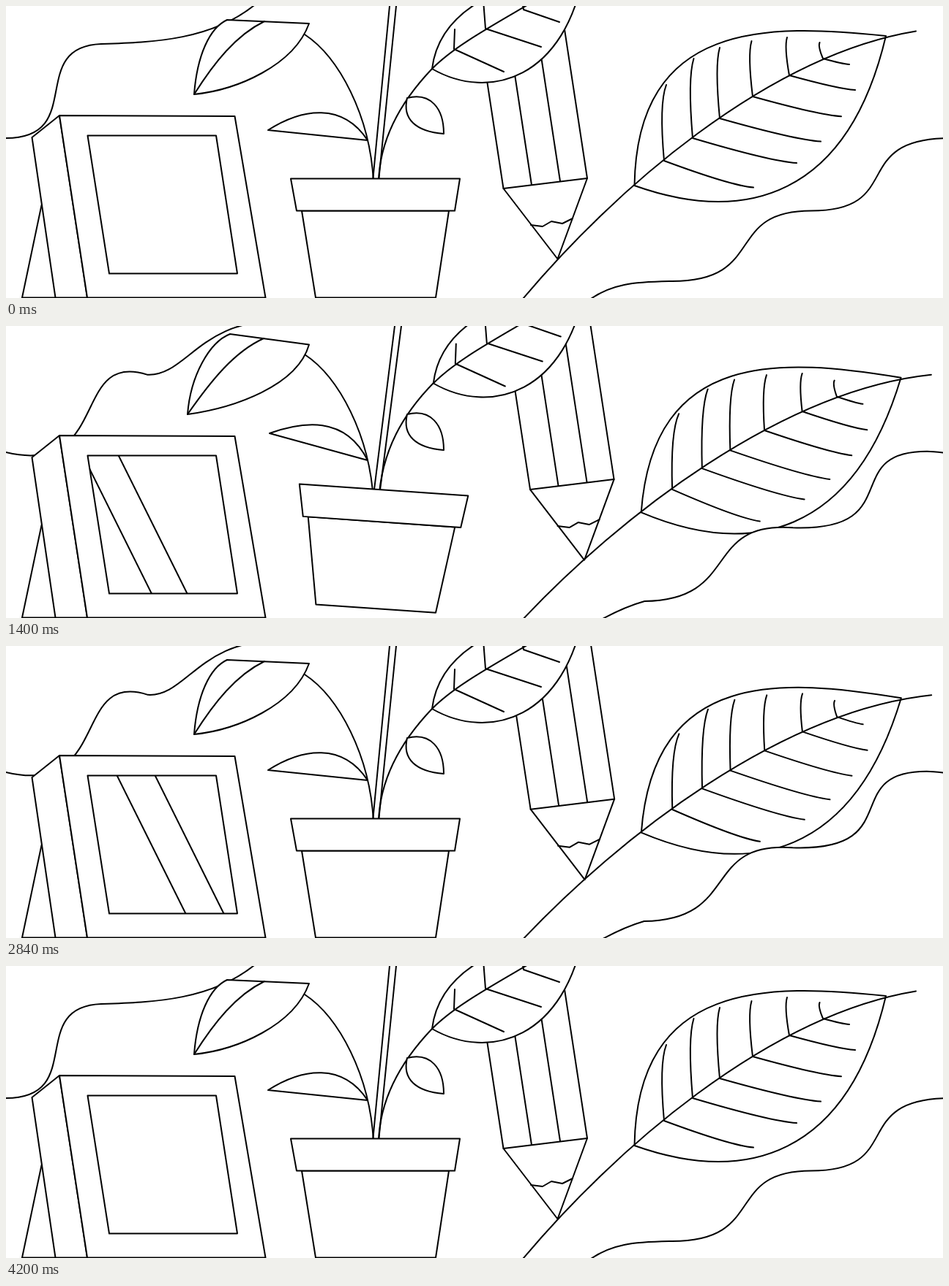
Recreate the animation shown at these times as an HTML page with a canvas. Size 1280 by 400 pixels, loop 4.24 s.

```html
<!DOCTYPE html>
<html lang="en">
<head>
<meta charset="utf-8">
<title>Desk line drawing</title>
<style>
  html, body { margin: 0; width: 100%; height: 100%; overflow: hidden; background: #fff; }
  canvas { display: block; }
</style>
</head>
<body>
<canvas id="stage" width="1280" height="400"></canvas>
<script>
const ctx = document.getElementById('stage').getContext('2d');
const LOOP = 4240, HALF = LOOP / 2, FRAME = 40;

const clamp = u => Math.min(1, Math.max(0, u));
const easeInOut = u => u < 0.5 ? 4 * u ** 3 : 1 - 4 * (1 - u) ** 3;
const ramp = (t, from, to) => easeInOut(clamp((t - from) / (to - from)));

// Points are [x, y], or [x, y, endX, endY] when they move with k.
const morph = (points, k) => points.map(([x, y, x2 = x, y2 = y]) => [x + (x2 - x) * k, y + (y2 - y) * k]);

// A start point followed by groups of three Bézier points.
function trace(points) {
  ctx.beginPath();
  ctx.moveTo(...points[0]);
  for (let i = 1; i < points.length; i += 3)
    ctx.bezierCurveTo(...points[i], ...points[i + 1], ...points[i + 2]);
}

function curve(...points) {
  trace(points);
  ctx.stroke();
}

function shape(...points) {
  trace(points);
  ctx.closePath();
  ctx.fill();
  ctx.stroke();
}

function line(...points) {
  ctx.beginPath();
  points.forEach(p => ctx.lineTo(...p));
  ctx.stroke();
}

function polygon(...points) {
  ctx.beginPath();
  points.forEach(p => ctx.lineTo(...p));
  ctx.closePath();
  ctx.fill();
  ctx.stroke();
}

function group(x, y, degrees, [pivotX, pivotY], draw) {
  ctx.save();
  ctx.translate(x + pivotX, y + pivotY);
  ctx.rotate(degrees * Math.PI / 180);
  ctx.translate(-pivotX, -pivotY);
  draw();
  ctx.restore();
}

function drawLeftWave(drift) {
  curve(...morph([
    [0, 181, 0, 171.5],
    [110, 181, 150, 212], [28, 56, 100, 29], [130, 52, 205, 69.5],
    [200, 50, 255, 74], [285, 47, 263, -24], [345, -6, 385, -6]
  ], drift));
}

function drawRightWave(drift) {
  const corner = [1340, 430];
  shape(...morph([
    [790, 408, 800, 411],
    [825, 378, 830, 395], [865, 378, 848, 384], [910, 377, 865, 377],
    [1040, 377, 997, 375], [980, 280.5, 945, 265], [1100, 280.5, 1070, 275.5],
    [1230, 280.5, 1232, 282], [1150, 181, 1135, 170], [1290, 181, 1252, 170],
    [1310, 181, 1275, 170], [1320, 181, 1300, 178], [1340, 181],
    corner, corner, corner
  ], drift));
}

function drawBox(t) {
  polygon([48.5, 273], [22, 399.5], [100, 399.5]);
  polygon([73, 150], [35.5, 180], [67.5, 399.5], [111, 399.5]);
  polygon([73, 150], [312.5, 151], [354.5, 399.5], [111, 399.5]);
  polygon([111.5, 177.5], [287, 177.5], [316, 366.5], [141, 366.5]);
  ctx.save();
  ctx.clip();
  // The glare slows down halfway across the glass.
  const glare = (middle, centre, speed, bend) => {
    const s = (t - centre) / 1000, x = middle + speed * s + bend * s ** 3;
    line([x, 178], [x + 93.5, 366.5]);
  };
  glare(130.2, 2140, 9.5, 43.9);
  glare(189.3, 2240, 6.1, 50.9);
  ctx.restore();
}

function drawPencil() {
  const left = [679.5, 250], right = [794, 236], tip = [753.5, 346.5];
  const along = (p, length) => [p[0] - 0.152 * length, p[1] - length];
  polygon(along(left, 300), along(right, 300), right, tip, left);
  line(left, right);
  for (const p of [[718, 245], [757, 240]]) line(along(p, 300), p);
  line([717, 300], [733, 302], [745, 295], [760, 298], [774, 291]);
}

function drawBigLeaf() {
  const base = [858.5, 246], tip = [1202, 41];
  shape(base, [862, 20], [1040, 24], tip, [1150, 262], [1010, 300], base);
  curve([702, 406], [830, 252], [1040, 68], [1243, 34.5]);
  // Each rib pair: where it leaves the midrib, its rise and its reach to the right.
  const ribs = [[899, 212, 104, 122], [938, 181, 109, 142], [975, 154, 97, 138],
    [1020, 124, 76, 121], [1070, 95, 52, 90], [1116, 72, 22, 36]];
  ribs.forEach(([x, y, rise, reach], i) => {
    const drop = reach * (0.22 + 0.08 / (1 + i) ** 2);
    ctx.beginPath();
    ctx.moveTo(x + 3 - 1.5 * i, y - rise);
    ctx.quadraticCurveTo(x - 7, y - 0.75 * rise, x, y);
    ctx.quadraticCurveTo(x + 0.75 * reach, y + 0.93 * drop, x + reach, y + drop);
    ctx.stroke();
  });
}

function drawPlant(sway) {
  const pose = (draw, ...points) => draw(...morph(points, sway));

  curve([408, 39], [455, 70], [497, 150], [502, 240]);
  pose(curve, [509, 240], [511, 180, 513, 170], [542, 128, 543, 120], [582, 86, 584, 78]);
  pose(line, [501, 240], [524, 0, 531, 0]);
  pose(line, [509, 240], [533, 0, 540, 0]);

  // Upper left leaf
  pose(shape, [414, 24, 414, 25.5],
    [393, 82, 398, 82], [315, 115, 312, 112], [257, 121, 248, 121],
    [261, 68, 252, 68], [278, 30, 278, 22], [302, 19, 306, 11]);
  pose(curve, [257, 121, 248, 121], [284, 78, 280, 75], [314, 40, 312, 35], [353, 21, 352, 17]);

  // Lower left leaf
  pose(shape, [358, 170, 360, 147], [405, 140, 405, 131], [460, 132, 463, 122], [494, 184]);

  // Small right leaf
  group(0, -5 * sway, 0, [0, 0], () =>
    shape([548, 126], [580, 118], [598, 140], [598, 175], [560, 172], [541, 155], [548, 126]));

  // Large right leaf
  group(1.8 * sway, -7.5 * sway, 0, [0, 0], () => {
    const base = [582, 86], tip = [790, -50];
    shape(base, [590, 20], [650, -30], tip, [765, 100], [660, 131], base);
    curve(base, [625, 42], [710, 5], tip);
    line([613, 32], [612, 59], [680, 90]);
    line([652, -8], [655, 31], [731, 56]);
    line([705, -8], [707, 5], [756, 22]);
  });
}

function drawPot() {
  polygon([404, 280.5], [605, 280.5], [587, 399.5], [423, 399.5]);
  polygon([389, 236.5], [620, 236.5], [613, 280.5], [397, 280.5]);
}

function render(t) {
  const drift = easeInOut(1 - Math.abs((t - 10) / HALF - 1));
  const tilt = ramp(t, 0, 1000) - ramp(t, 1720, 2560);
  const sway = ramp(t, 200, 1180) - ramp(t, 1880, 2720);
  const lift = 10.8 * Math.max(0, 1 - ((t - 880) / 840) ** 2);

  ctx.fillStyle = '#fff';
  ctx.fillRect(0, 0, 1280, 400);
  ctx.strokeStyle = '#000';
  ctx.lineWidth = 2;
  ctx.lineCap = ctx.lineJoin = 'round';

  drawLeftWave(drift);
  drawBox(t);
  group(43.7 * drift, -31 * drift, 0, [0, 0], drawPencil);
  group(0, 0, 4 * drift, [702, 408], drawBigLeaf);
  drawPlant(sway);
  group(0, -lift, 4 * tilt, [587, 399.5], drawPot);
  drawRightWave(drift);
}

function tick() {
  const t = performance.now() % LOOP;
  render(Math.floor(t / FRAME) * FRAME);
  requestAnimationFrame(tick);
}
tick();
</script>
</body>
</html>
```
